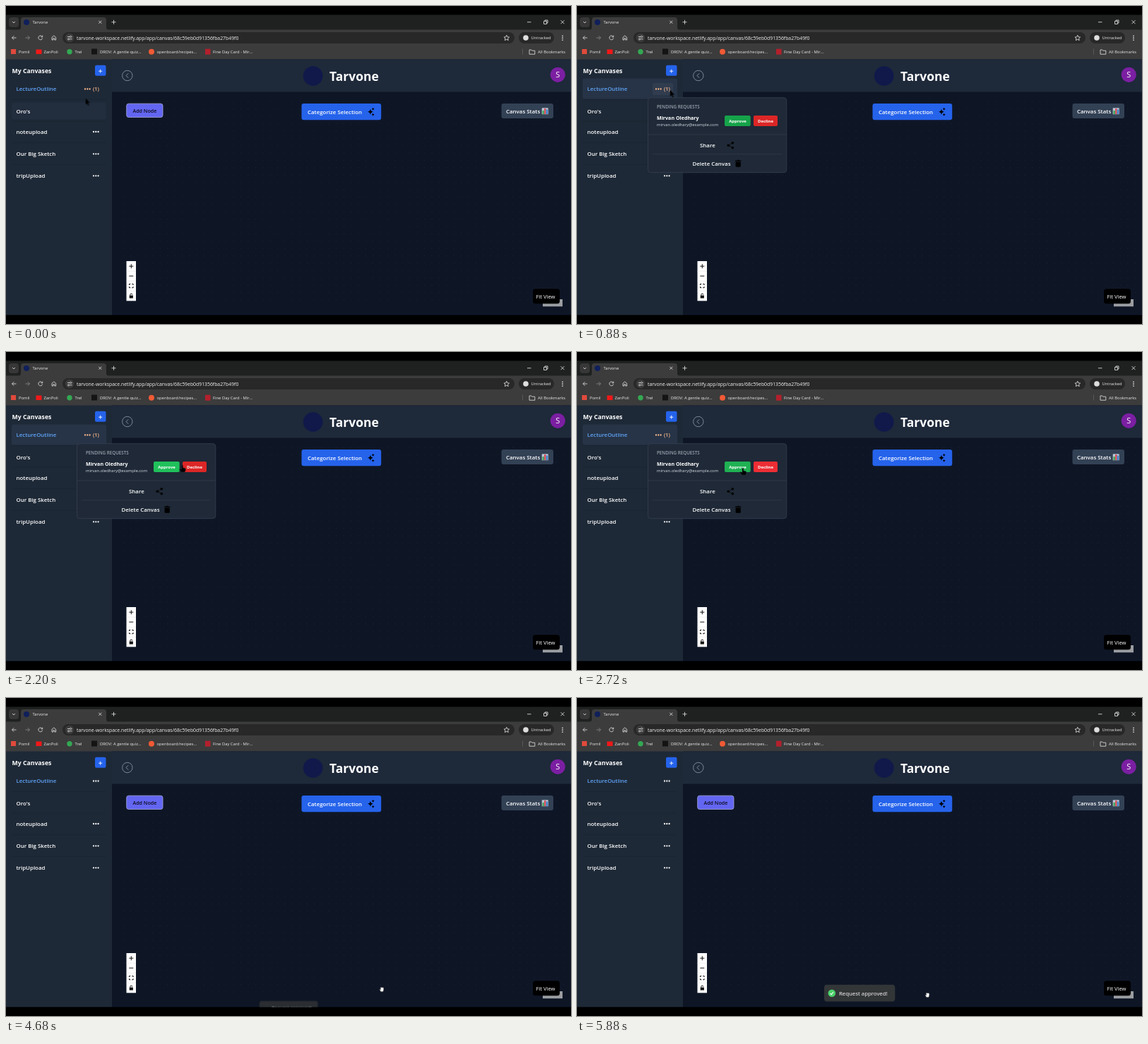
Recreate the animation shown at these times as an HTML page. Size 800 by 450 pixels, loop 5920 ms.

```html
<!DOCTYPE html>
<html lang="en">
<head>
<meta charset="utf-8">
<title>Canvas requests</title>
<style>
html, body { margin: 0; width: 100%; height: 100%; overflow: hidden; background: #000; }
svg { display: block; width: 100vw; height: 100vh; }
text { font-family: "Open Sans", "Noto Sans", sans-serif; fill: #fff; white-space: pre; }
.bar { font-size: 5.85px; font-weight: 500; fill: #ececec; }
.item { font-size: 7.9px; font-weight: 600; }
.btn { font-size: 5.9px; font-weight: 700; }
.line { fill: none; stroke: #d5d5d5; stroke-width: .9; }
.ink { fill: none; stroke: #111; stroke-width: 1; }
.rule { stroke: #374151; stroke-width: .6; }

.anim { animation: 5920ms linear infinite; }
.cursor { animation-name: travel; }
.arrow, .hand, .grab, .popup, .before, .after { animation-timing-function: step-end; }
.arrow { animation-name: arrow; }
.hand { animation-name: hand; }
.grab, .after { animation-name: late; }
.before { animation-name: early; }
.popup { animation-name: popup; }
.row1 { animation-name: row1; }
.row2 { animation-name: row2; }
.more { animation-name: more; }
.approve { animation-name: approve; }
.decline { animation-name: decline; }
.toast, .tick { transform-box: fill-box; transform-origin: center; }
.toast { animation-name: rise; }
.tick { animation-name: pop; }

@keyframes travel {
  0% { transform: translate(112.5px, 130.5px); animation-timing-function: ease-out; }
  6.08%, 13.51% { transform: translate(125px, 115px); }
  27.7%, 30.41% { transform: translate(195px, 155px); }
  38.85%, 40.54% { transform: translate(262px, 161px); }
  45.27%, 52.03% { transform: translate(234px, 164px); }
  54% { transform: translate(232.5px, 164px); }
  56.08%, 66.22% { transform: translate(234px, 164px); }
  75.68% { transform: translate(339px, 276px); }
  79.05% { transform: translate(532px, 412px); }
  89.53%, 100% { transform: translate(496px, 420px); }
}
@keyframes arrow {
  0%, 14.19%, 66.72% { opacity: 1; }
  2.03%, 32.16%, 67.57%, 100% { opacity: 0; }
}
@keyframes hand {
  0%, 14.19%, 66.72%, 100% { opacity: 0; }
  2.03%, 32.16% { opacity: 1; }
}
@keyframes late { 0% { opacity: 0; } 67.57%, 100% { opacity: 1; } }
@keyframes early { 0% { opacity: 1; } 67.57%, 100% { opacity: 0; } }
@keyframes popup { 0%, 67.57%, 100% { opacity: 0; } 12.84% { opacity: 1; } }
@keyframes row1 {
  0%, 1% { opacity: 0; }
  3.5%, 67.57% { opacity: 1; }
  70.1%, 100% { opacity: 0; }
}
@keyframes row2 { 0% { opacity: .45; } 2.5%, 100% { opacity: 0; } }
@keyframes more {
  0%, 4% { opacity: 0; }
  6.5%, 14.19% { opacity: 1; }
  16.7%, 100% { opacity: 0; }
}
@keyframes approve {
  0%, 32.16% { fill: #16a34a; }
  34.7%, 36.8% { fill: #22c55e; }
  39.3%, 43.24% { fill: #16a34a; }
  45.27%, 62.83% { fill: #1fb153; }
  62.84%, 100% { fill: #22c55e; }
}
@keyframes decline {
  0%, 37.4% { fill: #dc2626; }
  39.9%, 62.83% { fill: #ee2d34; }
  62.84%, 100% { fill: #dc2626; }
}
@keyframes rise {
  0%, 77.93% { opacity: 0; transform: translateY(200%) scale(.6); }
  77.94% { opacity: .5; transform: translateY(200%) scale(.6); animation-timing-function: cubic-bezier(.21, 1.02, .73, 1); }
  83.85%, 100% { opacity: 1; transform: none; }
}
@keyframes pop {
  0%, 79.63% { transform: scale(0); animation-timing-function: cubic-bezier(.175, .885, .32, 1.275); }
  84.7%, 100% { transform: scale(1); }
}
</style>
</head>
<body>
<svg viewBox="0 0 800 450" preserveAspectRatio="none">
  <defs>
    <pattern id="grid" x="161" y="130" width="10.4" height="10.4" patternUnits="userSpaceOnUse">
      <circle cx="5.2" cy="5.2" r=".45" fill="#263141"/>
    </pattern>
    <g id="dots"><circle r="1.15"/><circle cx="3.3" r="1.15"/><circle cx="6.6" r="1.15"/></g>
    <path id="star" d="M0-1Q.15-.15 1 0Q.15.15 0 1Q-.15.15-1 0Q-.15-.15 0-1Z"/>
  </defs>
  <rect width="800" height="450"/>

  <!-- browser -->
  <rect y="12.5" width="800" height="22" fill="#1f2020"/>
  <rect y="33.500" width="800" height="42.500" fill="#3c3c3c"/>
  <path d="M17 34q4 0 4-4v-10q0-4 4-4h113q4 0 4 4v10q0 4 4 4z" fill="#3c3c3c"/>
  <rect x="4" y="16" width="14" height="14" rx="4" fill="#373737"/>
  <path class="line" d="M9 22l2 2 2-2M131.300 20.800l4 4m0-4l-4 4M149.500 22.800h6m-3-3v6M738 22.800h5.500M785.500 20.200l5 5m0-5l-5 5"/>
  <path class="line" d="M761.500 21.500h4v4h-4zM763 21.300v-1.300h4v4h-1.300"/>
  <circle cx="29" cy="23" r="4" fill="#10205a"/>
  <text class="bar" x="37.500" y="25">Tarvone</text>

  <rect x="80" y="37" width="640" height="16" rx="8" fill="#282828"/>
  <circle cx="90" cy="45" r="6.200" fill="#3c3c3c"/>
  <path class="line" d="M87 43.500h3m3 0h.5M87 46.800h.5m3 0h3"/>
  <circle class="line" cx="91.500" cy="43.500" r="1.100"/><circle class="line" cx="88.700" cy="46.800" r="1.100"/>
  <path class="line" d="M14.500 45h-6m2.700-2.700l-2.700 2.700 2.700 2.700"/>
  <path class="line" style="stroke:#858585" d="M27.500 45h6m-2.700-2.700l2.700 2.700-2.700 2.700"/>
  <path class="line" d="M51.300 43.500a2.900 2.900 0 1 0 .3 2M51.700 41.700v2.200h-2.200M65 48v-3.700l2.800-2.300 2.800 2.300v3.700h-1.900v-2.300h-1.800v2.300z"/>
  <text x="100" y="47.600" font-size="6.860" font-weight="500" style="fill:#f2f2f2">tarvone-workspace.netlify.app/app/canvas/68c59eb0d91356fba27b49f0</text>
  <path class="line" d="M708.800 41.300l1.100 2.500 2.700.3-2 1.800.6 2.700-2.400-1.400-2.400 1.400.6-2.700-2-1.800 2.700-.3z"/>
  <rect x="726" y="37" width="50" height="16" rx="8" fill="#282828"/>
  <circle cx="736" cy="45" r="3.800" fill="#dedede"/>
  <text class="bar" x="743.500" y="47.200">Untracked</text>
  <g fill="#ddd"><circle cx="788" cy="42.300" r=".9"/><circle cx="788" cy="45.200" r=".9"/><circle cx="788" cy="48.100" r=".9"/></g>

  <rect x="7" y="61" width="7" height="7" fill="#e04a3c"/>
  <rect x="42.500" y="61.500" width="8" height="6.500" fill="#f01818"/>
  <circle cx="90" cy="64.700" r="3.700" fill="#34a853"/>
  <rect x="121" y="60.500" width="8" height="8" fill="#141414"/>
  <circle cx="206" cy="64.700" r="4" fill="#f05a35"/>
  <rect x="282" y="60.700" width="7.500" height="8" fill="#b3202c"/>
  <text class="bar" x="18" y="66.900">Pomil</text>
  <text class="bar" x="53.500" y="66.900">ZanPoli</text>
  <text class="bar" x="97.500" y="66.900">Trel</text>
  <text class="bar" x="133" y="66.900">DROV: A gentle quiz...</text>
  <text class="bar" x="213.500" y="66.900">openboard/recipes...</text>
  <text class="bar" x="293" y="66.900">Fine Day Card - Mir...</text>
  <path d="M731.500 60.500v8" stroke="#666" stroke-width=".7"/>
  <path class="line" d="M741 62h2.800l1 1.200h4v5h-7.800z"/>
  <text class="bar" x="753" y="66.900">All Bookmarks</text>

  <!-- workspace -->
  <rect x="150" y="75.500" width="650" height="362" fill="#0e1626"/>
  <rect x="161" y="130" width="630" height="291" fill="url(#grid)"/>
  <rect x="150" y="75.500" width="650" height="46" fill="#1e293a"/>
  <circle cx="171.800" cy="98.500" r="7.200" fill="none" stroke="#8590a0" stroke-width=".9"/>
  <path d="M173.200 95.300l-3.200 3.200 3.200 3.200" fill="none" stroke="#8590a0" stroke-width="1"/>
  <circle cx="434.700" cy="99" r="13.800" fill="#10194a"/>
  <text x="458" y="106" font-size="17.500" font-weight="700">Tarvone</text>
  <circle cx="781.300" cy="97.300" r="10.600" fill="#7b1fa2"/>
  <text x="781.300" y="101.300" font-size="11" text-anchor="middle">S</text>

  <rect x="170.700" y="138.200" width="51.300" height="19.300" rx="3" fill="#6366f1" stroke="#a5a7d8" stroke-width=".8"/>
  <text x="179.500" y="150.600" font-size="7.100" font-weight="600" style="fill:#0c0c1c">Add Node</text>
  <rect x="418.500" y="138" width="112.700" height="23.200" rx="3" fill="#2563eb"/>
  <text class="item" x="427" y="152.800">Categorize Selection</text>
  <use href="#star" transform="translate(516 149.800) scale(4)"/>
  <use href="#star" transform="translate(519.700 145.700) scale(2)"/>
  <use href="#star" transform="translate(519.700 153.800) scale(2)"/>
  <rect x="701.500" y="138" width="73.500" height="21" rx="3" fill="#334155"/>
  <text class="item" x="708" y="151.500">Canvas Stats</text>
  <rect x="758.700" y="144.300" width="9" height="9" rx=".6" fill="#b9c4d2"/>
  <path d="M759.600 148h2.200v5h-2.200z" fill="#3aa655"/>
  <path d="M762.200 145h2.200v8h-2.200z" fill="#d8434e"/>
  <path d="M764.800 146.500h2.200v6.500h-2.200z" fill="#3b82d0"/>

  <rect x="170.500" y="361" width="13.500" height="56.300" fill="#fefefe"/>
  <path d="M170.500 375.200h13.500m-13.500 14h13.500m-13.500 14h13.500" stroke="#e5e5e5" stroke-width=".6"/>
  <path class="ink" d="M174.300 368.200h6m-3-3v6M174.300 382.100h6"/>
  <path class="ink" d="M174.500 395v-1.700h1.800m2 0h1.800v1.700m0 2v1.700h-1.800m-2 0h-1.800v-1.700"/>
  <path d="M174.700 409.500h5.200v4h-5.200z" fill="#111"/>
  <path class="ink" d="M175.800 409.500v-1a1.500 1.500 0 0 1 3 0"/>

  <rect x="760" y="415" width="28" height="10.200" fill="#9a9ca0"/>
  <rect x="746" y="400.300" width="38" height="21" rx="3.500" fill="#000"/>
  <text x="750.500" y="413.600" font-size="7.600" font-weight="500">Fit View</text>

  <!-- sidebar -->
  <rect y="75.500" width="150" height="362" fill="#1e2937"/>
  <text x="8.500" y="94.500" font-size="8.700" font-weight="700">My Canvases</text>
  <rect x="126" y="83.800" width="15.500" height="15" rx="2" fill="#2563eb"/>
  <path d="M131.200 92.200h5m-2.500-2.500v5" stroke="#fff" stroke-width=".9"/>
  <path d="M8 132.500h133.500M8 163h133.500M8 193.500h133.500M8 224.500h133.500" stroke="#1a2431" stroke-width=".8"/>
  <rect class="anim row1" x="8" y="102.500" width="134" height="29" rx="3" fill="#273447"/>
  <rect class="anim row2" x="8" y="136.500" width="133.500" height="24" rx="3" fill="#273447"/>
  <rect class="anim more" x="107" y="109" width="29" height="17" rx="2.500" fill="#364153"/>
  <text class="item" x="14.500" y="120.300" style="fill:#60a5fa">LectureOutline</text>
  <g class="anim before">
    <use href="#dots" x="112" y="117.500" fill="#fdba8c"/>
    <text x="123" y="120.300" font-size="7.400" font-weight="600" style="fill:#fdba8c">(1)</text>
  </g>
  <use class="anim after" href="#dots" x="124" y="117.500" fill="#fff"/>
  <text class="item" x="14.500" y="151.500">Oro's</text>
  <text class="item" x="14.500" y="181">noteupload</text>
  <text class="item" x="14.500" y="212.200">Our Big Sketch</text>
  <text class="item" x="14.500" y="243.300">tripUpload</text>
  <g fill="#fff">
    <use href="#dots" x="124" y="178"/><use href="#dots" x="124" y="209.300"/><use href="#dots" x="124" y="240.300"/>
  </g>

  <!-- requests menu -->
  <g class="anim popup">
    <rect x="100.500" y="129.700" width="196.300" height="106" rx="4" fill="#1f2937" stroke="#364152" stroke-width=".8"/>
    <text x="113" y="145" font-size="6.250" font-weight="600" style="fill:#9ca3af">PENDING REQUESTS</text>
    <text x="113" y="161.200" font-size="7.100" font-weight="700">Mirvan Oledhary</text>
    <text x="113" y="169.900" font-size="5.900" font-weight="500" style="fill:#d5dce5">mirvan.oledhary@example.com</text>
    <rect class="anim approve" x="209" y="155" width="36.700" height="15" rx="2"/>
    <text class="btn" x="227.500" y="164.700" text-anchor="middle">Approve</text>
    <rect class="anim decline" x="250" y="155" width="34" height="15" rx="2"/>
    <text class="btn" x="267" y="164.700" text-anchor="middle">Decline</text>
    <path class="rule" d="M101 182h195.500M107 209.700h183"/>
    <text class="item" x="174" y="200.300">Share</text>
    <path class="ink" d="M220.300 193.800l-6 3.400 6 3.400"/>
    <circle cx="220.300" cy="193.800" r="1.800"/><circle cx="214.300" cy="197.200" r="1.800"/><circle cx="220.300" cy="200.600" r="1.800"/>
    <text class="item" x="163.500" y="225.800">Delete Canvas</text>
    <path d="M224 218.500h2.500l.7-.8h2l.7.800h2.500v1.300h-8.400zM224.600 220.400h7.200v6.300q0 1-1 1h-5.200q-1 0-1-1z"/>
  </g>

  <!-- notice -->
  <g class="anim toast">
    <rect x="350" y="405.800" width="100.300" height="23.600" rx="4" fill="#333637"/>
    <g class="anim tick">
      <circle cx="360.800" cy="417.700" r="5.300" fill="#4bd06a"/>
      <path d="M358.400 417.900l1.700 1.700 3-3.600" fill="none" stroke="#fff" stroke-width="1.100"/>
    </g>
    <text x="371" y="420.500" font-size="7.850">Request approved!</text>
  </g>
  <rect y="437.500" width="800" height="12.500"/>

  <!-- pointer -->
  <g class="anim cursor">
    <path class="anim arrow" d="M0 0v9.300l2.100-1.900 1.500 3.200 1.500-.7-1.500-3.100h2.900z" fill="#000" stroke="#28303a" stroke-width=".3"/>
    <path class="anim hand" d="M0 .8q.9-.9 1.700 0v3.200l3.200.8q.8.300.7 1.300l-.6 3q-.2.900-1 .9h-3.500q-.6 0-1-.5l-2.600-3.300q.5-1 1.600-.3l1.500.8z" fill="#000" stroke="#28303a" stroke-width=".3"/>
    <path class="anim grab" d="M-1.800-2.300q.6-.7 1.100 0q.7-1 1.300 0q.7-.8 1.200.2q.9-.4 1 .5v2.300q-.1 1.700-1 2.700h-3q-1-1.200-1.800-2.900q.2-.8 1-.3l.6.600z" fill="#fff" stroke="#222" stroke-width=".4"/>
  </g>
</svg>
</body>
</html>
```
